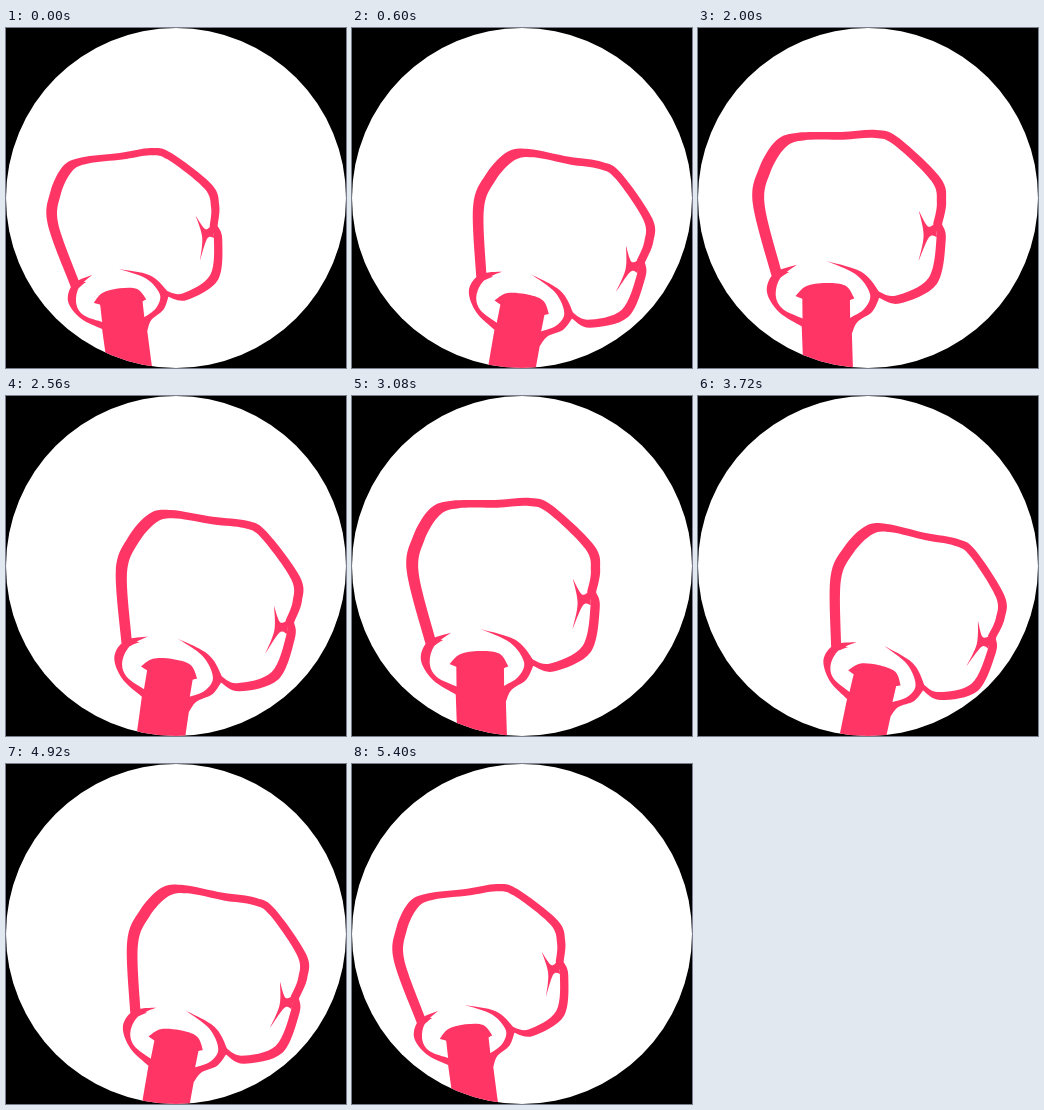
Animation of 340 by 340 pixels, one loop 5.44 s. Source, as an HTML page with a canvas:

```html
<!DOCTYPE html>
<html lang="en">
<head>
<meta charset="utf-8">
<title>Boxing glove</title>
<style>
  html, body { margin: 0; width: 100%; height: 100%; overflow: hidden; background: #000; }
  canvas { display: block; width: 340px; height: 340px; }
</style>
</head>
<body>
<canvas id="stage" width="340" height="340"></canvas>
<script>
const ctx = document.getElementById('stage').getContext('2d');
const PINK = '#ff3566';
const STEP = 40, LOOP = 5440, SWING = 27;

// Smooth curve through each run of points; runs meet at sharp corners.
function trace(...runs) {
  const path = new Path2D();
  let last = runs[0][0];
  path.moveTo(...last);
  runs.forEach((run, n) => {
    const pts = n ? [last, ...run] : run;
    for (let i = 0; i < pts.length - 1; i++) {
      const a = pts[i], b = pts[i + 1];
      const before = pts[i - 1] || a, after = pts[i + 2] || b;
      path.bezierCurveTo(
        a[0] + (b[0] - before[0]) / 6, a[1] + (b[1] - before[1]) / 6,
        b[0] - (after[0] - a[0]) / 6, b[1] - (after[1] - a[1]) / 6,
        b[0], b[1]);
    }
    last = pts[pts.length - 1];
  });
  path.closePath();
  return path;
}

const glove = trace(
  [[75, 246], [57, 172], [64, 136], [82, 108], [104, 100.5], [148, 100.5],
   [184, 99], [206, 107], [248, 148], [254, 173], [249.5, 196]],
  [[253, 212], [243, 257], [205, 276], [184, 270]]);

// The hollow is the glove shrunk towards its thin side.
const hollow = new Path2D();
hollow.addPath(glove, new DOMMatrix([0.891, 0, 0, 0.91, 18.2, 16.9]));

const thumb = trace(
  [[226, 182], [235, 198], [243, 194]],
  [[244, 209]],
  [[236, 209], [225, 233]],
  [[230.5, 207], [226, 182]]);

// Round the outside of cuff and arm, then back along the opening.
const cuff = trace(
  [[101, 235], [78, 243], [70, 262], [82, 283], [105, 298]],
  [[108, 420]], [[158, 420]], [[156, 306]],
  [[162, 294], [177, 284], [184, 271]],
  [[183, 262], [166, 243], [132, 232]],
  [[161, 246], [175, 266], [169, 281], [154.5, 290]],
  [[154.5, 272]], [[159, 270]],
  [[150, 257], [130, 254], [110, 257], [99, 267]],
  [[106, 270]], [[106, 290]],
  [[86, 280], [79, 266], [84, 248], [101, 235]]);

const opening = new Path2D();
opening.ellipse(127, 265, 52, 30, 0, 0, Math.PI * 2);

const disc = new Path2D();
disc.arc(170, 170, 170, 0, Math.PI * 2);

// Left, middle and right pose: cuff position, scaled cosine and sine of the tilt.
const PIVOT = [132, 232];
const poses = [
  [113, 241, 0.87, -0.1],
  [141.5, 227.5, 1.065, 0.05],
  [194, 253.8, 0.855, 0.231]
];

function poseAt(time) {
  const p = Math.floor((time % LOOP) / STEP) % SWING;
  const u = p < 6 ? p / 6 : 2 - Math.abs(p - 13) / 7;
  const i = u < 1 ? 0 : 1;
  return poses[i].map((v, k) => v + (poses[i + 1][k] - v) * (u - i));
}

function paint(color, ...shapes) {
  ctx.fillStyle = color;
  shapes.forEach(shape => ctx.fill(shape));
}

function draw(time) {
  const [x, y, c, s] = poseAt(time);
  ctx.fillStyle = '#000';
  ctx.fillRect(0, 0, 340, 340);
  paint('#fff', disc);
  ctx.save();
  ctx.clip(disc);
  ctx.transform(c, s, -s, c, x, y);
  ctx.translate(-PIVOT[0], -PIVOT[1]);
  paint(PINK, glove);
  paint('#fff', hollow, opening);
  paint(PINK, thumb, cuff);
  ctx.restore();
}

const start = performance.now();
function tick(now) {
  draw(Math.max(0, now - start));
  requestAnimationFrame(tick);
}
draw(0);
requestAnimationFrame(tick);
</script>
</body>
</html>
```
